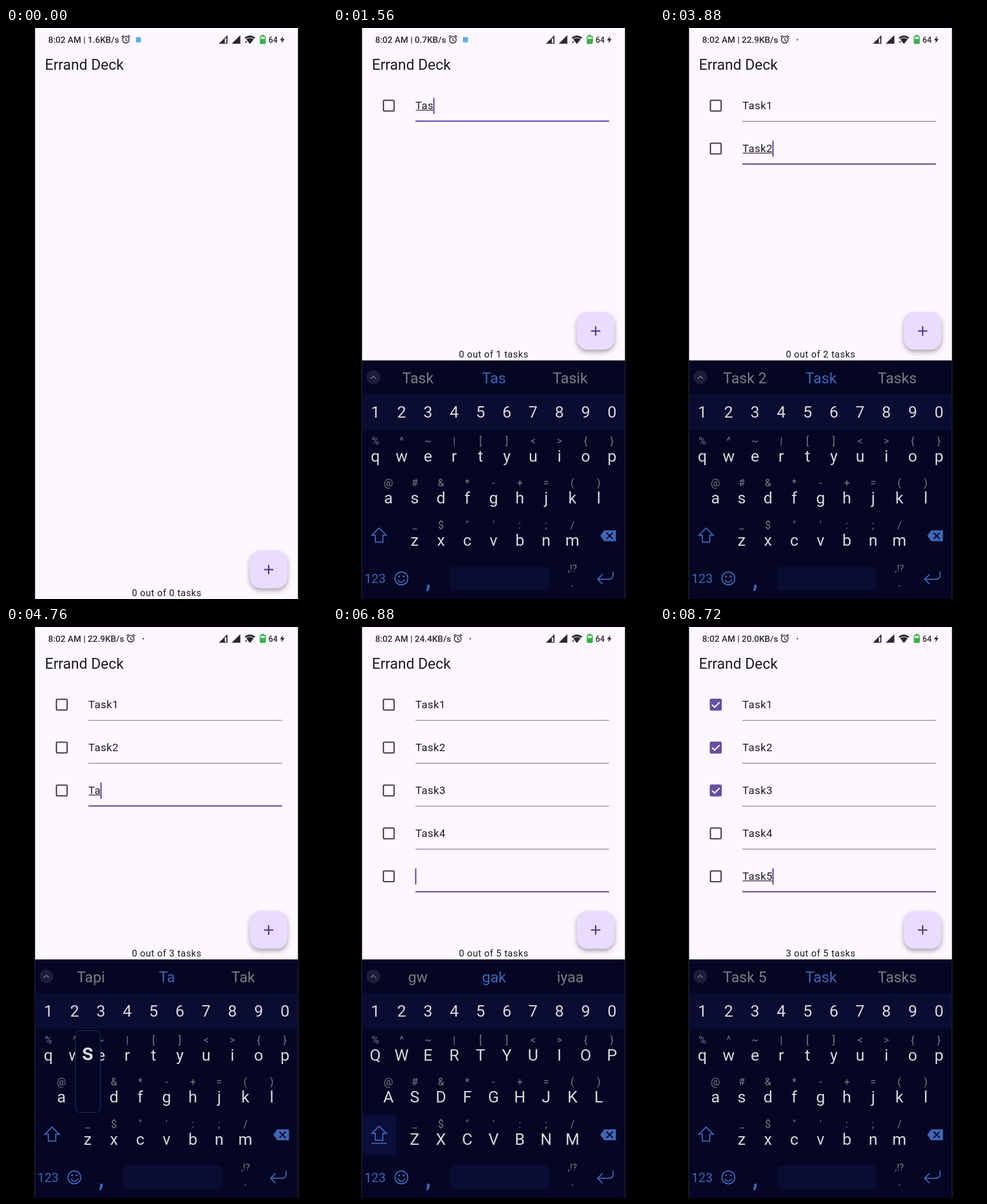
Write an HTML page with a canvas that moves like this. It is 561 by 998 pixels and loops after 8800 ms.

```html
<!DOCTYPE html>
<html lang="en">
<head>
<meta charset="utf-8">
<title>Task list</title>
<style>
  html, body { margin: 0; width: 100%; height: 100%; overflow: hidden; background: #000; }
  canvas { display: block; }
</style>
</head>
<body>
<canvas id="stage" width="561" height="998"></canvas>
<script>
const ctx = document.getElementById('stage').getContext('2d');
const LOOP = 8800, STEP = 40, BLINK = 200;
const LEFT = 50.5, WIDTH = 460, KB_TOP = 581, KB_HEIGHT = 417, ROW = 75, TEXT_X = 144, PITCH = 45.95;
const INK = '#1d1b20', PURPLE = '#6750a4', PAPER = '#fdf7ff';
const NIGHT = '#040624', PANEL = '#0a0c31', BLUE = '#4166b4', GREY = '#7d7d80', KEY = '#d9d9dc';

// When each row is added, focused, auto-capitalised and typed.
const rows = [
  { add: 160, focus: 680, caps: 1040, keys: [1280, 1440, 1560, 1680, 1920] },
  { add: 2680, focus: 3040, caps: 3240, keys: [3360, 3480, 3600, 3720, 3840] },
  { add: 4160, focus: 4440, caps: 4520, keys: [4640, 4720, 4800, 4960, 5080] },
  { add: 5400, focus: 5700, caps: 5760, keys: [5920, 6030, 6060, 6090, 6120] },
  { add: 6480, focus: 6760, caps: 6840, keys: [7080, 7240, 7340, 7430, 7520] }
];
const checks = [8160, 8360, 8560];
const speeds = [[0, '1.6'], [40, '0.7'], [1640, '9.6'], [3240, '22.9'], [4840, '22.5'], [6440, '24.4'], [8080, '20.0']];
const keyRows = [
  { x: 74, y: 177, keys: 'qwertyuiop', hints: '%^~|[]<>{}' },
  { x: 96.8, y: 250, keys: 'asdfghjkl', hints: '@#&*-+=()' },
  { x: 142.7, y: 324, keys: 'zxcvbnm', hints: '_$"\':;/' }
];

const clamp = v => Math.max(0, Math.min(1, v));

function text(s, x, y, size, color, { align = 'left', weight = 400, spacing = 0 } = {}) {
  ctx.font = `${weight} ${size}px Roboto, sans-serif`;
  ctx.letterSpacing = spacing + 'px';
  ctx.textAlign = align;
  ctx.fillStyle = color;
  ctx.fillText(s, x, y);
}

function rect(x, y, w, h, color) {
  ctx.fillStyle = color;
  ctx.fillRect(x, y, w, h);
}

function rounded(x, y, w, h, r) {
  ctx.beginPath();
  ctx.roundRect(x, y, w, h, r);
}

function path(points, close) {
  ctx.beginPath();
  points.forEach(([x, y]) => ctx.lineTo(x, y));
  if (close) ctx.closePath();
}

function fill(color) {
  ctx.fillStyle = color;
  ctx.fill();
}

function stroke(color, width) {
  ctx.strokeStyle = color;
  ctx.lineWidth = width;
  ctx.stroke();
}

function circle(x, y, r) {
  ctx.beginPath();
  ctx.arc(x, y, r, 0, 7);
}

function drawAlarm(x, y) {
  circle(x, y + 0.5, 5.8);
  stroke('#2b2930', 1.5);
  path([[x, y - 3], [x, y + 1], [x + 2.8, y + 2.6]]);
  stroke('#2b2930', 1.3);
  for (const s of [-1, 1]) {
    path([[x + s * 3.6, y - 7.4], [x + s * 7.2, y - 4.4]]);
    stroke('#2b2930', 1.6);
  }
}

function drawStatus(t) {
  const dark = '#2b2930';
  const speed = speeds.filter(s => s[0] <= t).pop()[1];
  const long = speed.length > 3;
  text(`8:02 AM | ${speed}KB/s`, 73.8, 26, 15.3, dark, { weight: 500 });
  drawAlarm(long ? 218 : 209.5, 20);
  if (long) {
    circle(240, 20.5, 1.2);
    fill(dark);
  } else {
    rect(227, 16, 9, 9, '#5fb2e4');
  }
  for (const x of [372, 394.5]) {
    path([[x, 27.5], [x + 15, 12.5], [x + 15, 27.5]], true);
    fill(dark);
  }
  rect(382.5, 18, 2.6, 8.2, PAPER);

  path([[426.3, 28], [417, 16.5]]);
  ctx.quadraticCurveTo(426.3, 9.5, 435.6, 16.5);
  ctx.closePath();
  fill(dark);
  ctx.beginPath();
  ctx.arc(426.3, 28, 11, -2.25, -0.89);
  stroke(PAPER, 1.2);
  if (t < 8080) {
    rect(417, 20.5, 4, 7, PAPER);
    rect(418.5, 23, 2, 3, dark);
  }

  rect(446.5, 12, 4.5, 2.5, '#37b34a');
  rounded(443.5, 13.5, 10.5, 14.5, 2);
  fill('#37b34a');
  rect(445.2, 15.4, 7.1, 3.8, '#e7f5e8');
  text('64', 458.8, 25.6, 14, dark, { weight: 500 });
  path([[484.5, 14], [478.8, 21.4], [482.4, 21.4], [481, 26.8], [487.2, 19.2], [483.4, 19.2]], true);
  fill(dark);
}

function drawCheckbox(y, checkedAt, t) {
  const p = checkedAt ? clamp((t - checkedAt + STEP) / 80) : 0;
  rounded(88.1, y - 9.1, 18.7, 18.7, 1.8);
  if (!p) return stroke('#49454f', 2.34);
  ctx.globalAlpha = p;
  fill(PURPLE);
  stroke(PURPLE, 2.34);
  path([[91, y + 0.4], [95.4, y + 4.8], [104.2, y - 4]]);
  stroke('#fff', 2.2);
  ctx.globalAlpha = 1;
}

function drawRow(i, t, active) {
  const row = rows[i], y = 135.5 + i * ROW;
  const typed = row.keys.filter(k => k <= t);
  const value = ('Task' + (i + 1)).slice(0, typed.length);
  const next = rows[i + 1];
  const lit = t >= row.focus + STEP && !(next && t >= next.focus + STEP);

  drawCheckbox(y, checks[i], t);
  if (lit) rect(144, y + 26.1, 338.5, 2.34, PURPLE);
  else rect(144, y + 27.1, 338.5, 1.17, '#79747e');

  text(value, TEXT_X, y + 6.5, 18.72, INK, { spacing: 0.585 });
  if (!active) return;
  const w = ctx.measureText(value).width;
  if (w) rect(TEXT_X + 0.5, y + 7.6, w - 1, 1.2, INK);
  const since = t - Math.max(row.focus, ...typed);
  if (Math.floor(since / BLINK) % 2 === 0) rect(TEXT_X + w - 0.6, y - 13.5, 2.34, 28, PURPLE);
}

function drawFab(bottom, t) {
  const size = 65.5, x = 426.3, y = bottom - 84.2;
  const cx = x + size / 2, cy = y + size / 2;
  ctx.save();
  ctx.shadowColor = 'rgba(0,0,0,.34)';
  ctx.shadowBlur = 9;
  ctx.shadowOffsetY = 4;
  rounded(x, y, size, size, 18.7);
  fill('#e9dcff');
  ctx.restore();
  for (const { add } of rows.slice(1)) {
    const p = (t - add + 120) / 240;
    if (p > 0 && p < 1) fill(`rgba(79,55,139,${0.12 * Math.sin(p * Math.PI)})`);
  }
  path([[cx - 8.2, cy], [cx + 8.2, cy]]);
  stroke('#4f378b', 2.34);
  path([[cx, cy - 8.2], [cx, cy + 8.2]]);
  stroke('#4f378b', 2.34);
}

function suggestions(n, count) {
  return [
    ['gw', 'gak', 'iyaa'],
    ['Tapi', 'Tp', 'Terima'],
    ['Tapi', 'Ta', 'Tak'],
    ['Task', 'Tas', 'Tasik'],
    ['Task', 'Task', 'Tasks'],
    n === 1 ? ['Task 17', 'Task', 'Task 1'] : ['Task ' + n, 'Task', 'Tasks']
  ][count];
}

function drawShift(on) {
  if (on) rect(LEFT, 272, 60, 70, '#0b0e38');
  const y = on ? 291.5 : 293;
  path([[80.5, y], [93, y + 12.5], [87, y + 12.5], [87, y + 24.5],
        [74, y + 24.5], [74, y + 12.5], [68, y + 12.5]], true);
  stroke(BLUE, 2);
  if (on) rect(67, 320.5, 27, 2, BLUE);
}

function drawBottomKeys() {
  text('123', 73.5, 389, 22, BLUE, { align: 'center' });
  circle(119.5, 381, 11.2);
  stroke(BLUE, 2);
  for (const x of [115.5, 123.5]) {
    circle(x, 377.5, 1.7);
    fill(BLUE);
  }
  ctx.beginPath();
  ctx.arc(119.5, 381.5, 6.2, 0.25, Math.PI - 0.25);
  stroke(BLUE, 1.8);
  text(',', 166.5, 396.5, 38, BLUE, { align: 'center', weight: 700 });
  rounded(204.5, 360, 174, 41.5, 7);
  fill(PANEL);
  text(',!?', 418.5, 369, 17, GREY, { align: 'center' });
  text('.', 418.5, 395, 19, GREY, { align: 'center' });
  path([[489.5, 369], [489.5, 375]]);
  ctx.quadraticCurveTo(489.5, 382.5, 482, 382.5);
  ctx.lineTo(462.5, 382.5);
  stroke(BLUE, 2);
  path([[471, 374], [462.5, 382.5], [471, 391]]);
  stroke(BLUE, 2);
}

function drawPopup(x, y, label) {
  rounded(x - 21.5, y - 125.5, 43.5, 143, 8);
  fill(NIGHT);
  stroke('#1d2d5c', 1.2);
  text(label, x, y - 74, label >= 'a' ? 40 : 32, '#dcdce0', { align: 'center', weight: 500 });
}

function drawKeyboard(top, t, index) {
  const row = rows[index], n = index + 1;
  const upper = t >= row.caps && t < row.keys[0];
  const count = row.keys.filter(k => k <= t).length;
  const stale = index > 0 && t < row.focus + STEP;
  const words = stale ? suggestions(index, 5) : suggestions(n, count);
  const mid = { align: 'center' };

  ctx.save();
  ctx.translate(0, top);
  rect(LEFT, 0, WIDTH, 420, NIGHT);
  circle(70.5, 29.5, 12);
  fill('#1c1d38');
  path([[66, 32], [70.5, 27.5], [75, 32]]);
  stroke('#8a8a92', 1.2);
  words.forEach((w, i) => text(w, 148.3 + i * 133.1, 40, 26, i === 1 ? BLUE : GREY, mid));

  rect(LEFT, 59, WIDTH, 62.5, PANEL);
  [...'1234567890'].forEach((d, i) => text(d, 74 + i * PITCH, 100, 28, KEY, mid));
  drawShift(upper);
  for (const { x, y, keys, hints } of keyRows) {
    [...keys].forEach((k, i) => {
      const kx = x + i * PITCH;
      text(hints[i], kx, y - 30, 18, GREY, mid);
      text(upper ? k.toUpperCase() : k, kx, y, 28, KEY, mid);
    });
  }
  path([[467, 306.5], [474, 297], [494.5, 297], [494.5, 316], [474, 316]], true);
  fill(BLUE);
  for (const s of [-1, 1]) {
    path([[478, 306.5 - s * 5.5], [489, 306.5 + s * 5.5]]);
    stroke(NIGHT, 2.2);
  }
  drawBottomKeys();

  row.keys.forEach((at, i) => {
    if (t < at - 60 || t >= at) return;
    const k = 'task'[i];
    if (!k) return drawPopup(74 + index * PITCH, 100, String(n));
    const line = keyRows.find(r => r.keys.includes(k));
    drawPopup(line.x + line.keys.indexOf(k) * PITCH, line.y, upper ? k.toUpperCase() : k);
  });
  ctx.restore();
}

// Distance the keyboard still has to travel; zero once settled.
function slide(t) {
  if (t < 704) return KB_HEIGHT;
  return t >= 1040 ? 0 : KB_HEIGHT * Math.exp(-(t - 704) / 61.2);
}

function draw(t) {
  rect(0, 0, 561, 998, '#000');
  ctx.save();
  ctx.beginPath();
  ctx.rect(LEFT, 0, WIDTH, 998);
  ctx.clip();
  rect(LEFT, 0, WIDTH, 998, PAPER);
  drawStatus(t);
  text('Errand Deck', 68, 73, 25.74, INK);

  const active = rows.filter(r => r.focus <= t).length - 1;
  const added = rows.filter(r => r.add <= t).length;
  const done = checks.filter(c => c <= t).length;
  for (let i = 0; i < added; i++) drawRow(i, t, i === active);

  // The page resizes one step behind the keyboard.
  const bottom = KB_TOP + slide(t - STEP);
  text(`${done} out of ${added} tasks`, 280.8, bottom - 5, 16.4, INK, { align: 'center', spacing: 0.55 });
  drawFab(bottom, t);
  if (active >= 0) drawKeyboard(KB_TOP + slide(t), t, active);
  ctx.restore();
}

const start = performance.now();
function tick() {
  const t = (performance.now() - start) % LOOP;
  draw(Math.floor(t / STEP) * STEP);
  requestAnimationFrame(tick);
}
tick();
</script>
</body>
</html>
```
